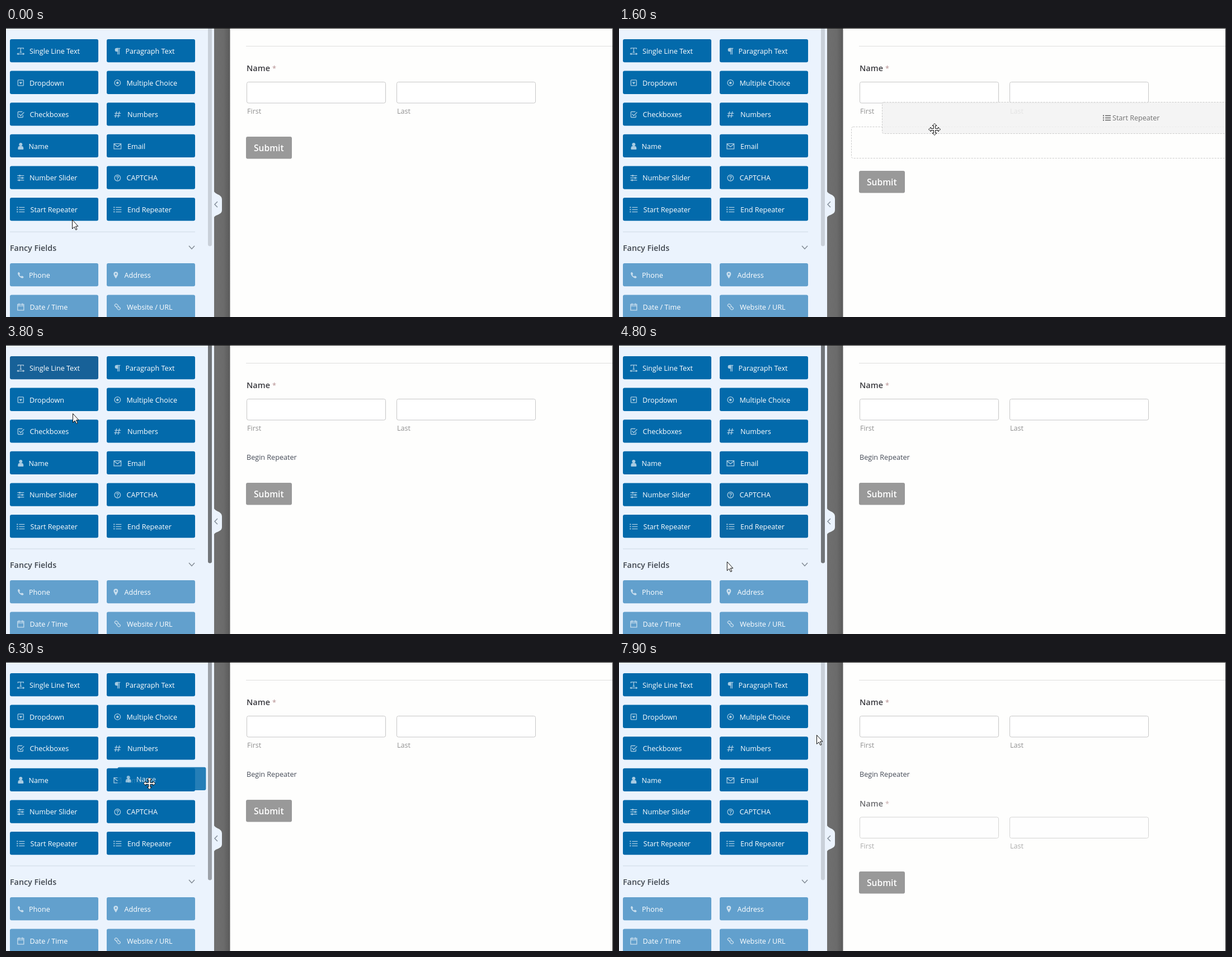
These frames come from a looping animation (1085x516 px, 8 s). An HTML page:

```html
<!DOCTYPE html>
<html lang="en">
<head>
<meta charset="utf-8">
<title>Form builder</title>
<style>
html, body { margin: 0; width: 100%; height: 100%; overflow: hidden; background: #fefefd; }
svg { display: block; }
text { font: 12.6px "Open Sans", "Noto Sans", sans-serif; }
.label { font-size: 14.5px; font-weight: 600; fill: #3b3b40; }
.head { font-size: 14.3px; font-weight: 600; fill: #40474f; }
.sub { fill: #8f8f8f; }
.submit { font-size: 15.6px; font-weight: 600; fill: #fff; }
.btn text { fill: #fff; }
.btn .icon { color: #fff; opacity: .65; }
.ghost text { fill: #707070; }
.ghost .icon { color: #606060; }
.icon path { fill: none; stroke: currentColor; stroke-width: 1.3; }
.icon path + path { fill: currentColor; stroke: none; }
.cursor path { fill: #fff; stroke: #111; stroke-width: 1; stroke-linejoin: round; }
.dash { stroke: #cbcbcb; stroke-dasharray: 3 2; }
</style>
</head>
<body>
<svg id="stage" width="1085" height="516" viewBox="0 0 1085 516"></svg>
<script>
const LOOP = 8000, STEP = 100;

// Each icon: outline path, then solid path, centred on 0,0
const ICONS = {
  text: ['M-5-3.5V-5.5H5V-3.5M0-5.5V2M-2 2H2M-6 5H6M-4 3.5-6 5-4 6.5M4 3.5 6 5 4 6.5', ''],
  para: ['M.5-5V6M3-5V6M-1-5H5', 'M1-5.5H-1.5a3.2 3.2 0 0 0 0 6.4H1Z'],
  drop: ['M-4-5H4Q5-5 5-4V4Q5 5 4 5H-4Q-5 5-5 4V-4Q-5-5-4-5Z', 'M-3-1.5H3L0 2.5Z'],
  radio: ['M-5.3 0a5.3 5.3 0 1 0 10.6 0a5.3 5.3 0 1 0-10.6 0', 'M-2.2 0a2.2 2.2 0 1 0 4.4 0a2.2 2.2 0 1 0-4.4 0'],
  check: ['M4 1V4Q4 5 3 5H-4Q-5 5-5 4V-4Q-5-5-4-5H3M-3-1 0 2 6-4', ''],
  hash: ['M-1.5-5.5-4 5.5M3.5-5.5 1 5.5M-5-2.2H6M-6 2.2H5', ''],
  user: ['', 'M-3-3a3 3 0 1 1 6 0a3 3 0 1 1-6 0M-5 5Q-5 0-2.5 0H2.5Q5 0 5 5Q5 6 4 6H-4Q-5 6-5 5'],
  mail: ['M-6.3-4.5H6.3V4.7H-6.3ZM-6-3.5 0 1 6-3.5', ''],
  slide: ['M-6-4H6M-6 0H6M-6 4H6', 'M-3-5.5H-.5V-2.5H-3ZM1.5-1.5H4V1.5H1.5ZM-4 2.5H-1.5V5.5H-4Z'],
  help: ['M-5.3 0a5.3 5.3 0 1 0 10.6 0a5.3 5.3 0 1 0-10.6 0M-1.8-1.2Q-1.6-3 0-3Q1.8-3 1.8-1.4Q1.8-.4.1.3V1.3', 'M-.8 2H.8V3.5H-.8Z'],
  list: ['M-3-4H7M-3 0H7M-3 4H7', 'M-7-5H-5V-3H-7ZM-7-1H-5V1H-7ZM-7 3H-5V5H-7Z'],
  phone: ['', 'M-5-4.5-3-5.5-1-2-2.5-.5Q-1.5 1.5.8 2.5L2 1 5.3 3 4.5 5Q2 6.5-2.5 2.5Q-6-1.5-5-4.5Z'],
  pin: ['', 'M-3 6Q-7 0-7-2a4 4 0 1 1 8 0Q1 0-3 6M-4.5-2a1.5 1.5 0 1 0 3 0a1.5 1.5 0 1 0-3 0'],
  date: ['M-5.5-4.5H5.5V6H-5.5ZM-5.5-1.8H5.5M-3-6.5V-3M3-6.5V-3', ''],
  link: ['M-1 1-4.5-1.5Q-6-3-4-4.5Q-2.5-6-1-4.5L1-2.5Q2-1 .5 0M1-1 4.5 1.5Q6 3 4 4.5Q2.5 6 1 4.5L-1 2.5Q-2 1-.5 0', '']
};

// label, icon, text x; filled in rows of two
const FIELDS = [
  ['Single Line Text', 'text', 42], ['Paragraph Text', 'para', 213.5],
  ['Dropdown', 'drop', 42], ['Multiple Choice', 'radio', 215.5],
  ['Checkboxes', 'check', 42.5], ['Numbers', 'hash', 217],
  ['Name', 'user', 40.5], ['Email', 'mail', 217],
  ['Number Slider', 'slide', 42], ['CAPTCHA', 'help', 215.5],
  ['Start Repeater', 'list', 43.5], ['End Repeater', 'list', 217]
];
const FANCY = [
  ['Phone', 'phone', 41], ['Address', 'pin', 211.5],
  ['Date / Time', 'date', 42.5], ['Website / URL', 'link', 216]
];

const CURSORS = {
  arrow: 'M.5.5V16.5L4.2 13 6.8 18.5 9 17.5 6.5 12H11Z',
  hand: 'M-1.7 1.5Q0-1.2 1.7 1.5V7Q4.2 5.5 4.7 8Q7 6.8 7.5 9Q10 8.2 10 11V15Q9.7 18 8 21H0Q-2-1-2 17Q-3.5 15-5 13Q-6 10.5-4 10.5Q-2.8 11-1.7 13Z'.replace('Q-2-1-2 17Q', 'L-2 17Q'),
  move: 'M0-10.5 4-6.5H1.5V-1.5H6.5V-4L10.5 0 6.5 4V1.5H1.5V6.5H4L0 10.5-4 6.5H-1.5V1.5H-6.5V4L-10.5 0-6.5-4V-1.5H-1.5V-6.5H-4Z'
};

// time, x, y
const PATH = [
  [0, 118, 342], [100, 112, 336], [400, 100, 330], [500, 100, 330], [800, 235, 285], [1200, 575, 150],
  [1500, 575, 150], [1600, 564, 181], [1700, 562, 222], [2000, 562, 222], [2500, 460, 285],
  [2800, 384, 300], [3000, 330, 230], [3100, 316, 208], [3200, 312, 205], [3450, 240, 95],
  [3650, 115, 45], [3770, 115, 45], [3800, 119, 122], [3900, 160, 150], [4200, 160, 150],
  [4450, 240, 50], [4650, 255, 205], [4850, 172, 447], [5100, 85, 150], [5400, 85, 150],
  [5600, 83, 110], [5700, 81, 72], [5800, 75, 50], [5900, 68, 130], [6000, 64, 218],
  [6100, 64, 218], [6600, 545, 215], [6700, 545, 215], [6900, 537, 254], [7100, 537, 254],
  [7900, 353, 130], [8000, 353, 130]
];
const BAR = [[0, 0], [400, 1], [500, 1], [900, 0], [2800, 0], [3100, 1], [6100, 1], [6500, 0], [8000, 0]];

// dx, dy: grip inside the dragged box; y1, y2: slot before and after the swap
const DRAGS = [
  { from: 600, drop: 2000, end: 2900, swap: 1600, dx: 94, dy: 49, y1: 47, y2: 176, field: 10, icon: 402, text: 412 },
  { from: 6200, drop: 7200, end: 7500, swap: 6800, dx: 57, dy: 29, y1: 176, y2: 228, field: 6, icon: 426, text: 434.5 }
];

const text = (x, y, s, c = '') => `<text x="${x}" y="${y}" class="${c}">${s}</text>`;
const box = (x, y, w, h, rest) => `<rect x="${x}" y="${y}" width="${w}" height="${h}" rx="3" ${rest}/>`;
const icon = (name, x, y) => `<g class="icon" transform="translate(${x} ${y})">` +
  ICONS[name].map(d => `<path fill-rule="evenodd" d="${d}"/>`).join('') + '</g>';
const place = (i, top) => [i % 2 ? 180 : 7, top + 56.6 * (i >> 1)];

function button([label, name, tx], i, top) {
  const [x, y] = place(i, top);
  return box(x, y, 158, 41.3, 'fill="#036aab"') + icon(name, x + 19.3, y + 21.3) + text(tx, y + 26, label);
}

function nameField(id) {
  const input = x => box(x, 96.5, 248, 37.5, 'fill="#fff" stroke="#c6c6c6"');
  return `<g id="${id}">` + text(430, 77, 'Name', 'label') +
    '<text x="476" y="77" fill="#b58f90">*</text>' +
    input(430.5) + input(698.5) + text(431, 152.5, 'First', 'sub') + text(699, 152.5, 'Last', 'sub') + '</g>';
}

function ghost(d, k) {
  const [label, name] = FIELDS[d.field];
  const [x, y] = place(d.field, 20);
  return `<g id="ghost${k}" class="ghost">` + box(.5, .5, 891, 56, 'fill="#f2f2f2" fill-opacity=".85" class="dash"') +
    icon(name, d.icon, 28.5) + text(d.text, 33, label) + '</g>' +
    `<g id="clone${k}" opacity=".85"><g class="btn" transform="translate(${-x} ${-y})">` +
    button(FIELDS[d.field], d.field, 20) + '</g></g>';
}

const stage = document.getElementById('stage');
stage.innerHTML = `
<defs><linearGradient id="shade"><stop stop-color="#6f6f6f"/><stop offset=".6" stop-color="#6b6b6b"/><stop offset="1" stop-color="#5a5a5a"/></linearGradient></defs>
<rect width="1085" height="516" fill="#fefefd"/>
<path d="M429 32.5H1085" stroke="#dedede"/>
${nameField('first')}
<g id="begin">${text(430, 204.5, 'Begin Repeater').replace('<text', '<text fill="#454b57"')}</g>
${nameField('second')}
<g id="submit">${box(429, 0, 82, 39.5, 'fill="#999"')}${text(443, 25.7, 'Submit', 'submit')}</g>
<g id="slot">${box(415.5, .5, 891, 56, 'fill="none" class="dash"')}</g>
<rect x="372" width="28.5" height="516" fill="url(#shade)"/>
<rect width="372" height="516" fill="#ebf3fd"/>
<path d="M371 289C372 298 386 296 386 306V325C386 335 372 332 371 341Z" fill="#ebf3fd"/>
<path d="M378 310 373 315 378 320" fill="none" stroke="#7c8794" stroke-width="1.4"/>
<path d="M361 0H368V386Q368 389.5 364.5 389.5Q361 389.5 361 386Z" fill="#c9d0d9"/>
<path id="bar" d="M361 0H368V386Q368 389.5 364.5 389.5Q361 389.5 361 386Z" fill="#717579"/>
${FIELDS.map((f, i) => `<g class="btn">${button(f, i, 20)}</g>`).join('')}
<path d="M7 364H338" stroke="#cdd8e3"/>
${text(7, 398, 'Fancy Fields', 'head')}
<path d="M327 389 332 394.5 337 389" fill="none" stroke="#828b95" stroke-width="1.5"/>
${FANCY.map((f, i) => `<g class="btn">${button(f, i, 420).replace('#036aab', '#62a0cd')}</g>`).join('')}
${DRAGS.map(ghost).join('')}
<path d="M0 .5H1084.5V516" fill="none" stroke="#1a1a1a"/>
<g id="cursor" class="cursor"><path/></g>`;

const el = id => document.getElementById(id);
const faces = [...stage.querySelectorAll('.btn > rect')].slice(0, FIELDS.length);
const show = (id, on) => el(id).setAttribute('visibility', on ? 'visible' : 'hidden');
const move = (id, x, y) => el(id).setAttribute('transform', `translate(${x} ${y})`);
const fade = (id, u) => {
  u = Math.max(0, Math.min(1, u));
  el(id).setAttribute('opacity', .5 - Math.cos(u * Math.PI) / 2);
};

function track(keys, t) {
  const n = Math.max(1, keys.findIndex(k => k[0] >= t));
  const a = keys[n - 1], b = keys[n], u = (t - a[0]) / (b[0] - a[0]);
  return a.slice(1).map((v, i) => v + (b[i + 1] - v) * u);
}

const dragAt = t => DRAGS.find(d => t >= d.from && t < d.drop);

function over(i, t) {
  if (t < 0 || dragAt(t)) return 0;
  const [px, py] = track(PATH, t), [x, y] = place(i, 20);
  return +(px >= x && px < x + 158 && py >= y && py < y + 38);
}

function draw(t) {
  const [x, y] = track(PATH, t), drag = dragAt(t);
  let slot = null;

  DRAGS.forEach((d, k) => {
    const held = d === drag, wide = x > 400;
    const pending = t >= d.drop && t < d.end;
    show('ghost' + k, pending || held && wide);
    show('clone' + k, held && !wide);
    const gx = pending ? 415 : x - d.dx, gy = pending ? d.y2 : y - d.dy;
    move('ghost' + k, gx, gy);
    move('clone' + k, gx, gy);
    if (held && wide) slot = t < d.swap ? d.y1 : d.y2;
  });
  show('slot', slot !== null);
  move('slot', 0, slot || 0);

  const [a, b] = DRAGS, room = slot !== null ? 61 : 0;
  move('first', 0, slot === a.y1 ? 61 : 0);
  move('begin', 0, drag === b && slot === b.y1 ? 61 : 0);
  move('second', 0, 180.5);
  fade('begin', (t - a.end) / 600);
  fade('second', (t - b.end) / 600);

  const waiting = DRAGS.some(d => t >= d.drop && t < d.end) ? 61 : room;
  const rest = t < a.end ? 194 : t < b.end ? 246 : 374;
  move('submit', 0, rest + waiting);

  el('bar').setAttribute('opacity', track(BAR, t)[0]);

  let pointing = false;
  faces.forEach((face, i) => {
    let u = 0;
    for (let k = 0; k < 6; k++) u += over(i, t - k * 24) / 6;
    if (drag) u = 0;
    if (over(i, t)) pointing = true;
    const mix = (p, q) => Math.round(p + (q - p) * u);
    face.setAttribute('fill', `rgb(${mix(3, 33)},${mix(106, 93)},${mix(171, 143)})`);
  });

  move('cursor', x, y);
  el('cursor').firstChild.setAttribute('d', CURSORS[drag ? 'move' : pointing ? 'hand' : 'arrow']);
}

const start = performance.now();
function tick() {
  const t = (performance.now() - start) % LOOP;
  draw(Math.floor(t / STEP) * STEP);
  requestAnimationFrame(tick);
}
tick();
</script>
</body>
</html>
```
